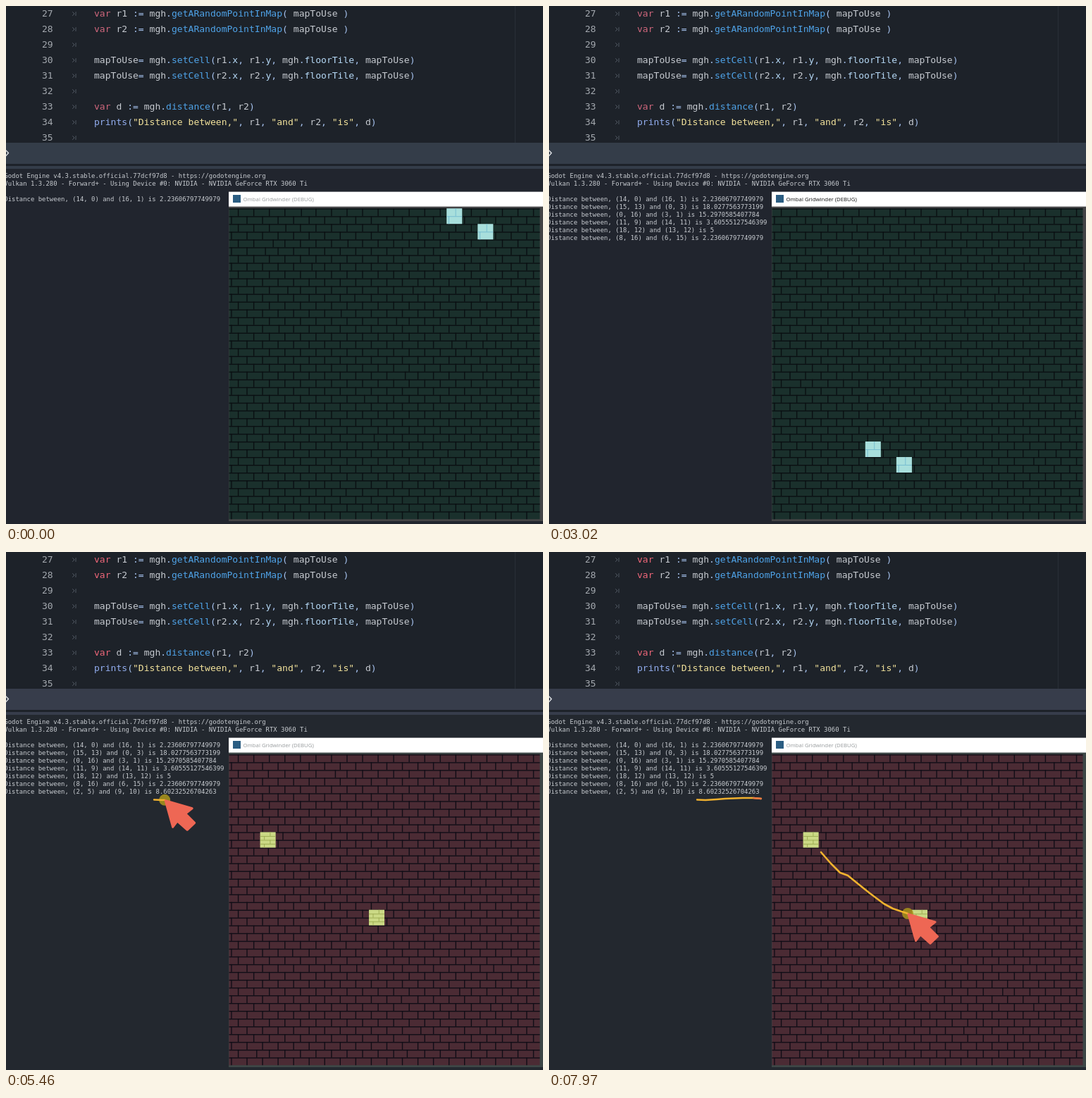
An HTML page with a canvas for the animation above (8000 ms loop, 762x735 px).

```html
<!DOCTYPE html>
<html lang="en">
<head>
<meta charset="utf-8">
<title>Distance between two cells</title>
<style>
html, body { margin: 0; width: 100%; height: 100%; overflow: hidden; background: #21252e; }
canvas { display: block; }
</style>
</head>
<body>
<canvas id="stage" width="762" height="735"></canvas>
<script>
const ctx = document.getElementById('stage').getContext('2d');
const LOOP = 8000;
const CELL = 22.05, COLS = 20, MAP_X = 316.5, MAP_Y = 287.2;
const PX = CELL / 16; // one pixel of the 16 x 16 tile art
const MONO = '"DejaVu Sans Mono", "Noto Sans Mono", monospace';

const GREEN = { brick: '#1a302c', joint: '#0a0f12' };
const RED = { brick: '#4b2b34', joint: '#100d16' };
const TEAL = { brick: '#a8dfdc', joint: '#78bed1' };
const LIME = { brick: '#cbd985', joint: '#9fae55' };

// each map: when it shows, when its line prints, its two cells
const maps = [
  { show: 0, print: 0, a: [14, 0], b: [16, 1], wall: GREEN, floor: TEAL, dist: '2.23606797749979' },
  { show: 700, print: 700, a: [15, 13], b: [0, 3], wall: RED, floor: TEAL, dist: '18.0277563773199' },
  { show: 1210, print: 1310, a: [0, 16], b: [3, 1], wall: RED, floor: TEAL, dist: '15.2970585407784' },
  { show: 1720, print: 1820, a: [11, 9], b: [14, 11], wall: GREEN, floor: TEAL, dist: '3.60555127546399' },
  { show: 2320, print: 2420, a: [18, 12], b: [13, 12], wall: GREEN, floor: TEAL, dist: '5' },
  { show: 2920, print: 3020, a: [8, 16], b: [6, 15], wall: GREEN, floor: TEAL, dist: '2.23606797749979' },
  { show: 3520, print: 3620, a: [2, 5], b: [9, 10], wall: RED, floor: LIME, dist: '8.60232526704263' }
];

const code = [
  'var r1 := mgh.getARandomPointInMap( mapToUse )',
  'var r2 := mgh.getARandomPointInMap( mapToUse )',
  '',
  'mapToUse= mgh.setCell(r1.x, r1.y, mgh.floorTile, mapToUse)',
  'mapToUse= mgh.setCell(r2.x, r2.y, mgh.floorTile, mapToUse)',
  '',
  'var d := mgh.distance(r1, r2)',
  'prints("Distance between,", r1, "and", r2, "is", d)',
  ''
];
const syntax = [
  [/^"[^"]*"/, '#f2e29b'],
  [/^var\b/, 'keyword'],
  [/^(getARandomPointInMap|setCell|distance)/, '#4fa3e8'],
  [/^prints/, '#93aef0'],
  [/^(floorTile|[xy]\b)/, '#b5d8f5'],
  [/^[:=.,()]+/, '#a6c2ee'],
  [/^(\w+|\s+)/, '#c6cad0']
];

const underline = [[210, 351.5], [222, 352], [238, 351], [250, 350], [275, 349], [290, 349], [301, 350]];
const link = [[386, 426], [400, 442], [413, 455], [424, 459], [440, 472], [455, 484], [475, 499], [488, 506], [509, 513]];
const arrow = [[1, 1], [39, 12], [29.5, 19.5], [42.5, 32.5], [32, 42.5], [18, 30], [11.5, 38.5]];

function rect(x, y, w, h, color) {
  ctx.fillStyle = color;
  ctx.fillRect(x, y, w, h);
}

function text(str, x, y, color) {
  ctx.fillStyle = color;
  ctx.fillText(str, x, y);
}

function polyline(pts, color, width) {
  ctx.beginPath();
  pts.forEach(p => ctx.lineTo(p[0], p[1]));
  ctx.lineCap = ctx.lineJoin = 'round';
  ctx.strokeStyle = color;
  ctx.lineWidth = width;
  ctx.stroke();
}

function seeded(seed) {
  let s = seed * 7919 + 17;
  return () => (s = (s * 16807) % 2147483647) / 2147483647;
}

function drawCode(late) {
  rect(0, 0, 762, 194, '#1d2229');
  rect(722, 0, 1, 194, '#292f37');
  ctx.font = '13.06px ' + MONO;
  code.forEach((line, i) => {
    const y = 15 + i * 22;
    text(String(27 + i), 51, y, '#a3a8ae');
    polyline([[94.5, y - 6.5], [97, y - 4], [94.5, y - 1.5]], '#535a65', 1);
    polyline([[99, y - 6.5], [99, y - 1.5]], '#535a65', 1);
    let x = 125;
    while (line) {
      const [re, color] = syntax.find(rule => rule[0].test(line));
      const word = line.match(re)[0];
      text(word, x, y, color === 'keyword' ? (late ? '#ee6679' : '#cf667c') : color);
      x += ctx.measureText(word).width;
      line = line.slice(word.length);
    }
  });
}

function drawConsole(t, late) {
  const bar = late ? '#373d4b' : '#343d49';
  rect(0, 194, 762, 541, late ? '#23282f' : '#21252e');
  rect(0, 194, 762, 30, bar);
  rect(0, 224, 762, 3, '#1d2229');
  rect(0, 227, 762, 4, bar);
  polyline([[-0.5, 204.5], [3.5, 208.5], [-0.5, 213]], '#e0e3e7', 1.4);

  ctx.font = '8.95px ' + MONO;
  const out = [
    'Godot Engine v4.3.stable.official.77dcf97d8 - https://godotengine.org',
    'Vulkan 1.3.280 - Forward+ - Using Device #0: NVIDIA - NVIDIA GeForce RTX 3060 Ti',
    ''
  ];
  for (const m of maps) {
    if (t >= m.print) out.push(`Distance between, (${m.a.join(', ')}) and (${m.b.join(', ')}) is ${m.dist}`);
  }
  out.forEach((line, i) => text(line, -2.7, 243.5 + i * 11, '#c8ccd1'));
}

function drawFloor([col, row], floor) {
  const x = MAP_X + col * CELL, y = MAP_Y + row * CELL;
  rect(x, y, CELL, CELL, floor.brick);
  if (floor === LIME) {
    for (let i = 0; i < 4; i++) {
      const ly = y + i * 4 * PX;
      if (i) rect(x, ly, CELL, 1, floor.joint);
      rect(x + (i % 2 ? 4 : 10) * PX, ly, 1, 4 * PX, floor.joint);
    }
    return;
  }
  rect(x, y + 8 * PX, CELL, 1, floor.joint);
  rect(x + 9 * PX, y, 1, 8 * PX, floor.joint);
  rect(x + 2 * PX, y + 8 * PX, 1, 8 * PX, floor.joint);
}

function drawMap(m, index) {
  const size = CELL * COLS, half = CELL / 2;
  const rand = seeded(index + 3);
  rect(MAP_X, MAP_Y, size, size, m.wall.brick);
  for (let row = 0; row < COLS * 2; row++) {
    const y = MAP_Y + row * half;
    rect(MAP_X, y, size, PX, m.wall.joint);
    for (let col = 0; col < COLS; col++) {
      // a few bricks are cut at an odd place
      const odd = rand() < 0.04 ? Math.round(rand() * 6 - 2) : 0;
      const x = MAP_X + col * CELL + ((row % 2 ? 2 : 9) + odd) * PX;
      rect(x, y, PX, half, m.wall.joint);
    }
  }
  drawFloor(m.a, m.floor);
  drawFloor(m.b, m.floor);
}

function drawWindow(t, late) {
  const active = t >= 300 && t < 4020;
  rect(316, 264, 446, 467, late ? '#3d4746' : '#444446');
  rect(316, 263.6, 446, 21, '#ffffff');
  rect(322, 268, 11, 11, '#2b5d82');
  ctx.font = '7.8px "Open Sans", "Noto Sans", sans-serif';
  text('Ombal Gridwinder (DEBUG)', 336.5, 276.7, active ? '#111111' : '#969a9c');
  const index = maps.findLastIndex(m => t >= m.show);
  drawMap(maps[index], index);
}

const mix = (a, b, k) => a + (b - a) * k;

function yAt(pts, x) {
  const i = Math.max(1, pts.findIndex(p => p[0] >= x));
  const [p, q] = [pts[i - 1], pts[i]];
  return mix(p[1], q[1], (x - p[0]) / (q[0] - p[0]));
}

// the pointer is sampled every 100 ms
function sample(t) {
  if (t > 7560) t = Math.max(7460, t - 10);
  return Math.max(4500, 4560 + Math.floor((t - 4560) / 100) * 100);
}

function pointerAt(t) {
  if (t < 4500) return [453, 600];
  const s = sample(t);
  const part = (from, to) => Math.min(1, Math.max(0, (s - from) / (to - from)));
  const line = (a, b, k) => [mix(a[0], b[0], k), mix(a[1], b[1], k)];
  if (s < 5360) {
    const k = part(4500, 5260);
    return line([377, 562], underline[0], k * k * (3 - 2 * k));
  }
  if (s <= 5960) {
    const x = mix(210, 301, part(5360, 5960));
    return [x, yAt(underline, x)];
  }
  if (s <= 6160) return line([301, 350], [339, 406], part(5960, 6160));
  if (s < 6860) return line([339, 406], link[0], part(6160, 6560));
  const x = s <= 7560 ? mix(386, 488, part(6860, 7560)) : mix(488, 509, part(7560, 7960));
  return [x, yAt(link, x)];
}

function drawPen(t) {
  const tip = pointerAt(t);
  const s = sample(t);
  const upTo = pts => [...pts.filter(p => p[0] < tip[0]), tip];
  const firstDone = s > 5960;

  if ((s >= 5360 && !firstDone) || s >= 6860) {
    ctx.beginPath();
    ctx.arc(tip[0], tip[1], 8, 0, Math.PI * 2);
    ctx.fillStyle = 'rgba(168, 147, 28, 0.88)';
    ctx.fill();
  }
  if (s >= 5360) polyline(firstDone ? underline : upTo(underline), '#efb02f', 2.3);
  if (firstDone) polyline(underline.slice(-2), '#ea7844', 2.3);
  if (s >= 6860) polyline(upTo(link), '#f0b32e', 2.6);

  ctx.save();
  ctx.translate(tip[0], tip[1]);
  polyline([...arrow, arrow[0]], '#ee6754', 3);
  ctx.fillStyle = '#ee6754';
  ctx.fill();
  ctx.restore();
}

function draw(t) {
  const late = t >= 4340;
  drawCode(late);
  drawConsole(t, late);
  drawWindow(t, late);
  if (t >= 4360) drawPen(t);
}

const start = performance.now();
(function run() {
  draw((performance.now() - start) % LOOP);
  requestAnimationFrame(run);
})();
</script>
</body>
</html>
```
